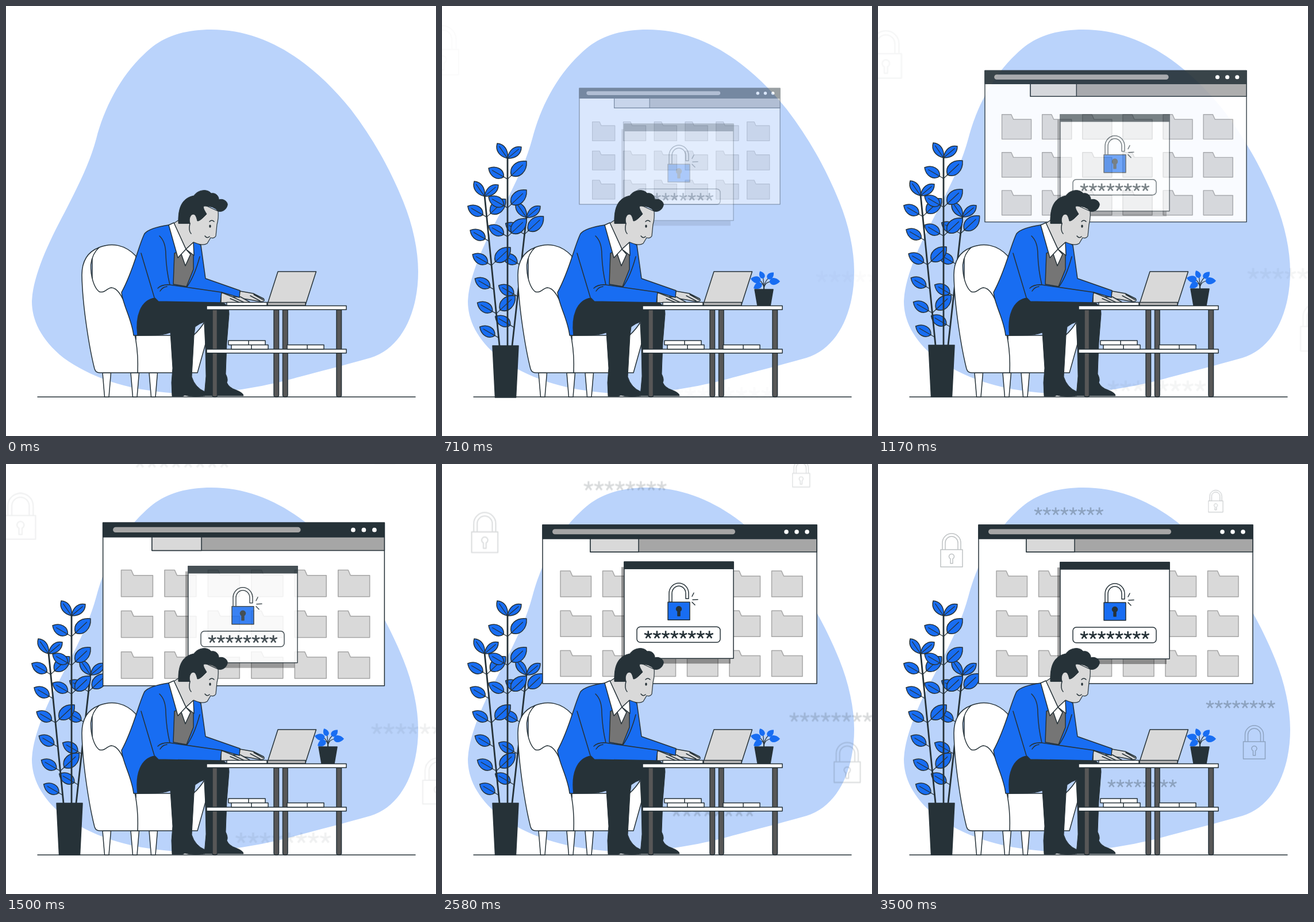
Animation of 748x748 px, one loop 3.54 s. Source, as an HTML page:

```html
<!DOCTYPE html>
<html lang="en">
<head>
<meta charset="utf-8">
<title>Password entry</title>
<style>
  html, body { margin: 0; width: 100%; height: 100%; overflow: hidden; background: #fff; }
  svg { display: block; width: 748px; height: 748px; }
  .line { fill: none; }
  .white { fill: #fff; }
  .blue { fill: #186df2; }
  .dark { fill: #263238; }
  .light { fill: #d9d9d9; }
  .mid { fill: #a6a6a6; }
  .gray { fill: #757575; }
  .post { fill: #575757; }
</style>
</head>
<body>
<svg viewBox="0 0 748 748" stroke="#263238" stroke-width="1.5" stroke-linejoin="round" stroke-linecap="round">
  <path fill="#bad3fb" stroke="none" d="M357 41C455 41 535 100 600 180C640 232 670 288 691 340C708 382 717 425 717 462C717 530 690 595 634 612C585 626 540 637 500 648C440 664 370 676 300 674C230 670 160 655 100 612C60 580 45 545 45 514C47 470 72 415 103 357C127 310 146 272 157 231C170 180 198 123 240 84C270 53 310 41 357 41Z"/>
  <g id="symbols" class="line"></g>
  <path class="line" d="M55 680H712"/>
  <g id="tallPlant"></g>
  <g id="window"></g>
  <g id="popup"></g>

  <g id="chair" class="white">
    <path d="M222 573H326Q338 562 345 550L347 588L333 638H229Z"/>
    <path d="M162 420C184 411 207 415 226 435V580L150 490V430Z"/>
    <path d="M162 420C141 428 132 446 132 468C133 525 146 600 154 631Q156 638 163 638H229C231 595 223 557 210 525C202 505 194 490 183 490C175 491 172 500 162 497C153 490 147 470 147.500 450C149 438 154 427 162 420Z"/>
  </g>

  <g id="man">
    <path class="dark" stroke-width="1" d="M229 573C226 540 235 514 255 508L375 515Q389 520 388 536L384 586L382 640Q387 650 384 655Q388 664 400 668Q413 673 413 678H345L348 644L346 549Q337 552 329 558L327 573L323 645Q329 664 346 671V678Q326 681 311 677L307 679H289L288 655L290 630L286 568Q273 573 251 573Z"/>
    <path class="light" d="M407 496L430 500L448 509Q452 515 441 514L425 511L405 508ZM425 504L442 513M431 502L447 511"/>
    <path class="light" d="M374 498L394 506H408L424 515Q418 518 407 516H374ZM394 506L415 516M390 509L407 516"/>
    <path class="blue" d="M283 381C262 384 247 389 241 396C230 418 222 460 201 498C203 520 219 545 222 573H229C225 540 234 512 259 508L265 514L373 516L375 498L406 507L407 495L347 474L339 416L326 408L300 380Z"/>
    <path class="gray" d="M293 430L291 484L314 488L326 458V430L313 424Z"/>
    <path class="white" d="M304 429L313 423L321 432L312 452Z"/>
    <path class="light" stroke-width="1.2" d="M292 378L301 372L322 355L347 347L369 357Q370 370 367 380L365 400Q362 405 356 403L350 413Q342 418 327 411L313 423Z"/>
    <path class="white" d="M283 381L292 377L313 423L299 438ZM313 423L326 411L327 434Z"/>
    <path class="line" d="M267 400Q278 410 278 433Q279 460 285 485L375 498M235 430L258 507M337 436Q328 470 315 488M264 491Q271 484 285 485M268 496Q272 489 280 488"/>
    <path class="dark" stroke-width="1" d="M300 378C299 351 306 334 327 330C333 320 350 317 357 326C365 324 371 332 370 337C378 334 387 341 385 347C383 355 375 359 369 357Q361 347 344 348C342 352 347 358 349 362C345 366 338 374 333 374C331 366 329 360 323 363C318 368 319 374 320 378Z"/>
    <path class="line" d="M320 378Q317 391 322 396M354 375Q358 371 362 375M346 400Q350 405 354 401"/>
    <path class="line" stroke-width="3.200" d="M355 382V384"/>
  </g>

  <g id="pottedPlant"></g>
  <g id="desk"></g>
</svg>
<script>
const LOOP = 3540;
const byId = id => document.getElementById(id);
const range = (n, fn) => Array.from({ length: n }, (_, i) => fn(i)).join('');
const path = (d, cls = '', extra = '') => `<path class="${cls}" d="${d}" ${extra}/>`;
const box = (x, y, w, h) => `M${x} ${y}h${w}v${h}h${-w}z`;
const taper = (x, y, w, h, inset) => `M${x} ${y}h${w}l${-inset} ${h}h${2 * inset - w}z`;

// Row of eight five-armed asterisks, centred vertically on y
const asterisks = (x, y) => path(range(40, i => {
  const angle = (i % 5) * Math.PI * .4 - Math.PI / 2;
  return `M${x + Math.floor(i / 5) * 15.2} ${y}l${7 * Math.cos(angle)} ${7 * Math.sin(angle)}`;
}), '', 'stroke-width="2.600" stroke-linecap="butt"');

const keyhole = (x, y) => `M${x - 2} ${y}a4.500 4.500 0 1 1 4 0v8h-4z`;

// Closed padlock outline; x, y is the top left corner of its body
const padlock = (x, y, size) => `<g transform="translate(${x} ${y}) scale(${size})">` +
  path(box(0, 0, 38, 30) + 'M3 0v-12a16 16 0 0 1 32 0v12M8 0v-12a11 11 0 0 1 22 0v12' + keyhole(19, 16)) + '</g>';

// Pointed leaf growing from (x, y) towards an offset, after a short stalk
function leaf(x, y, dx, dy, stalk = .2) {
  const at = (u, v) => `${x + dx * u - dy * v} ${y + dy * u + dx * v}`;
  return path(`M${at(stalk, 0)}C${at(.35, .31)} ${at(.75, .31)} ${at(1, 0)}` +
    `C${at(.75, -.31)} ${at(.35, -.31)} ${at(stalk, 0)}`, 'blue') +
    path(`M${at(0, 0)}L${at(.8, 0)}`, 'line', 'stroke-width="1.200"');
}

// Stem with a pair of leaves on top and more at even steps down its length
function stem({ x, y, foot, first, step, count, rightEvery }) {
  const pair = leaf(x, y + 2, -18, -26, 0) + leaf(x, y + 2, 24, -20, 0);
  return path(`M${x} ${y}L${foot} 590`, 'line', 'stroke-width="2.800"') + pair + range(count, i => {
    const nodeY = first + i * step;
    const nodeX = x + (foot - x) * (nodeY - y) / (590 - y);
    return leaf(nodeX, nodeY, -33, -19) + (i % rightEvery ? '' : leaf(nodeX, nodeY, 33, -31));
  });
}

byId('tallPlant').innerHTML =
  stem({ x: 147, y: 365, foot: 122, first: 396, step: 54, count: 4, rightEvery: 2 }) +
  stem({ x: 74, y: 328, foot: 100, first: 366, step: 42, count: 6, rightEvery: 2 }) +
  stem({ x: 114, y: 262, foot: 114, first: 300, step: 50, count: 3, rightEvery: 1 }) +
  path(taper(88, 590, 45, 90, 4.5), 'dark');

byId('pottedPlant').innerHTML = range(5, i => {
  const angle = (140 + i * 55) * Math.PI / 180;
  const dx = 26 * Math.cos(angle), dy = 19 * Math.sin(angle);
  return path(`M560 492Q560 480 ${562 + dx * .4} ${478 + dy * .4}`, 'line', 'stroke-width="1.200"') +
    `<g stroke="none">${leaf(562, 478, dx, dy, .3)}</g>`;
}) + path(taper(544, 492, 32, 29, 5), 'dark');

byId('window').innerHTML =
  path(box(175, 106, 477, 276), 'white') +
  path(box(175, 106, 477, 24), 'dark') +
  path(box(258, 130, 394, 23), 'mid') +
  path(box(258, 130, 84, 23), 'light') +
  path('M196.500 117.800H505.500', 'line', 'stroke="#a6a6a6" stroke-width="9"') +
  path(range(3, i => `M${599 + i * 18} 118h0`), '', 'stroke="#fff" stroke-width="7.500"') +
  path(range(18, i => `M${206 + i % 6 * 73.5} ${186 + Math.floor(i / 6) * 69.3}h17l4 9h32.500v36h-53.500z`),
    'light', 'stroke="#a6a6a6"');

byId('popup').innerHTML =
  path(box(312, 180, 190, 168), '', 'fill="#000" stroke="none" opacity=".36"') +
  path(box(317, 171, 190, 168), 'white') +
  path(box(317, 171, 190, 12), 'dark') +
  path('M395 241v-15a17 18 0 0 1 34 0v9h-5v-9a12 13 0 0 0 -24 0v15z', 'white') +
  path(box(393, 241, 38, 31), 'blue') +
  path(keyhole(412, 257), 'dark') +
  path('M435 231l3 -6M436 237l9 -.5M435 241l5 5', 'line') +
  '<rect class="white" x="339" y="284" width="145" height="27" rx="6"/>' +
  asterisks(358.7, 298);

byId('symbols').innerHTML =
  asterisks(278.7, 82.5) + asterisks(577.5, 418.5) + asterisks(406.3, 556) +
  padlock(109, 149, 1) + padlock(635.5, 483, 1) + padlock(575, 64, .66);

byId('chair').insertAdjacentHTML('afterbegin',
  path([168, 217, 249].map(x => taper(x, 638, 14.5, 42, 3.5)).join('')));

byId('desk').innerHTML =
  path('M473 462h66.500l-19 59h-66.500z', 'light') +
  path(box(455, 515.5, 66, 5.5), '', 'fill="#b7b7b7"') +
  path(box(384, 515.5, 70, 5.5), 'white') +
  path([359, 466, 481.5, 575].map(x => `M${x} 528.500h8.500v148.500q0 3 -4.250 3t-4.250 -3z`).join(''), 'post') +
  path([521.5, 597].map(y => box(349, y, 243, 6.8)).join(''), 'white') +
  path([[387, 582], [392, 589.5], [489, 589.5]]
    .map(([x, y]) => box(x, y, 35, 7.5) + box(x + 35, y, 29, 7.5)).join(''), 'white');

// CSS-style cubic Bezier easing, solved by bisection
function bezier(x1, y1, x2, y2) {
  const curve = (a, b, s) => 3 * (1 - s) ** 2 * s * a + 3 * (1 - s) * s * s * b + s ** 3;
  return x => {
    if (x <= 0) return 0;
    if (x >= 1) return 1;
    let low = 0, high = 1;
    for (let i = 0; i < 24; i++) {
      const s = (low + high) / 2;
      if (curve(x1, x2, s) < x) low = s; else high = s;
    }
    return curve(y1, y2, low);
  };
}
const overshoot = bezier(.36, -.01, .5, 1.38);
const easeIn = bezier(.42, 0, 1, 1);

function place(id, transform, opacity) {
  byId(id).setAttribute('transform', transform);
  byId(id).setAttribute('opacity', Math.max(0, Math.min(1, opacity)));
}
const zoom = (x, y, k) => `translate(${x} ${y}) scale(${k}) translate(${-x} ${-y})`;
const slide = dy => `translate(0 ${dy})`;

function draw(t) {
  const drop = overshoot((t + 12) / 750);
  place('tallPlant', slide(45 * (drop - 1)), drop);
  place('pottedPlant', slide(45 * (drop - 1)), drop);

  const grow = overshoot((t + 15) / 1980);
  place('window', zoom(413.5, 244, .5 + grow / 2), grow);

  const rise = overshoot((t - 45) / 2600);
  place('popup', slide(45 * (1 - rise)), rise);

  const gather = easeIn(t / 3500);
  place('symbols', zoom(399.5, 306, 1.5 - gather / 2), gather * .3);
}

const start = performance.now();
function tick() {
  draw((performance.now() - start) % LOOP);
  requestAnimationFrame(tick);
}
tick();
</script>
</body>
</html>
```
